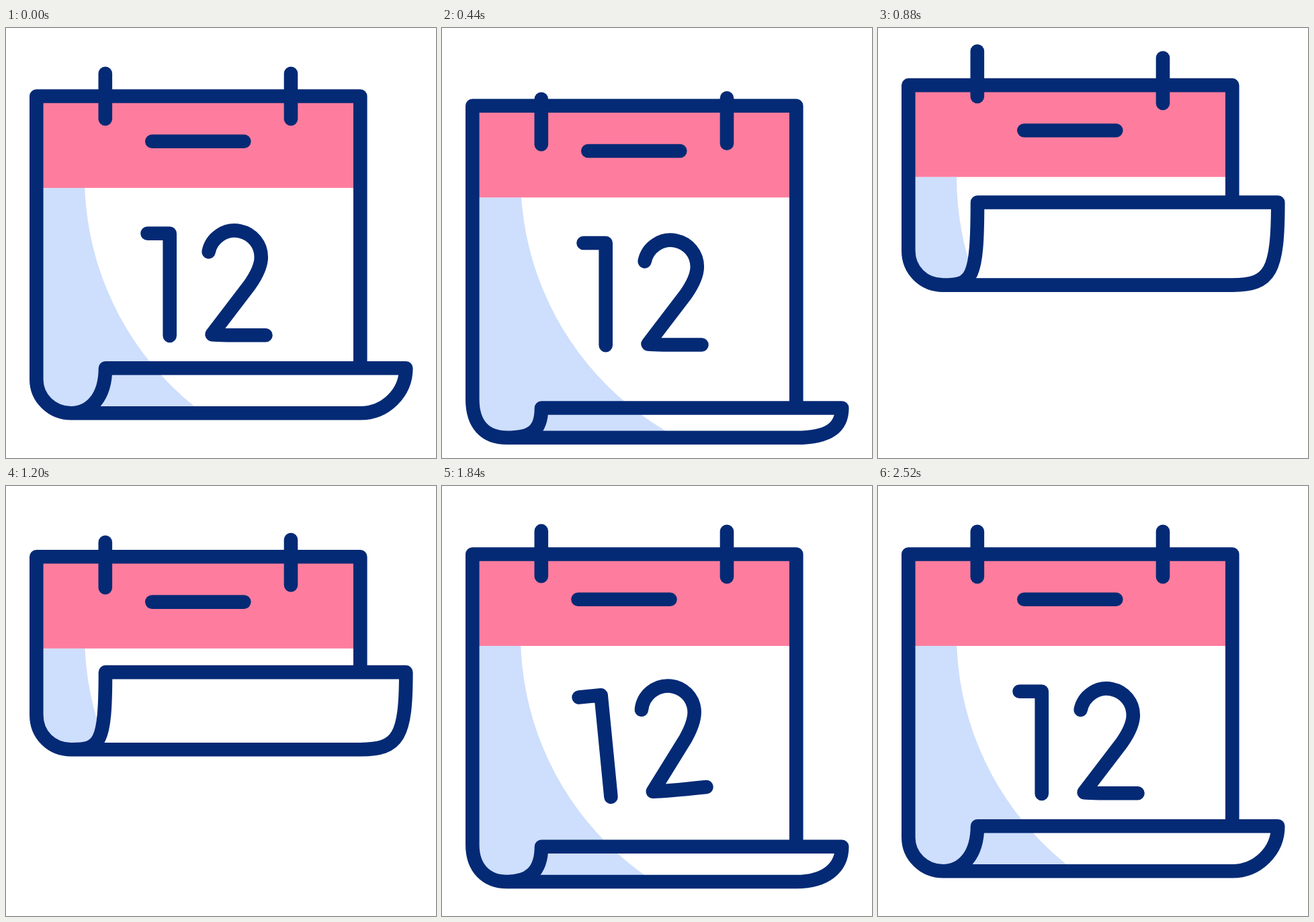
Write an HTML page with a canvas that moves like this. It is 640 by 640 pixels and loops after 2.88 s.

```html
<!DOCTYPE html>
<html lang="en">
<head>
<meta charset="utf-8">
<title>Calendar</title>
<style>
  html, body { margin: 0; width: 100%; height: 100%; overflow: hidden; background: #fff; }
  canvas { display: block; width: 640px; height: 640px; }
</style>
</head>
<body>
<canvas id="stage" width="640" height="640"></canvas>
<script>
const ctx = document.getElementById('stage').getContext('2d');
const NAVY = '#042a75', PINK = '#fe7d9e', BLUE = '#cedefd', WHITE = '#fff';
const LOOP = 2880, STEP = 40, MOVE_END = 2520;
const LEFT = 45.3, RIGHT = 527.3, CURL = 148, ROLL = 97, TIP = 595.3;
const REST_BOTTOM = 573.2;

const easeInOut = u => u < .5 ? 2 * u * u : 1 - 2 * (1 - u) ** 2;

// Swings between turning points given as [time, value].
function swing(...turns) {
  return time => turns.reduce((value, [t, target], i) => {
    const from = i ? turns[i - 1][0] : t;
    if (time <= from) return value;
    return value + (target - value) * easeInOut(Math.min(1, (time - from) / (t - from)));
  }, turns[0][1]);
}

const pageShift = swing([0, 0], [400, 16], [690, -30], [1120, 5], [1540, -11.5], [1840, 0]);
const ringShift = swing([0, 0], [410, 38], [720, -46], [1100, 18], [1510, -30], [1840, 0]);
const rollShift = swing([0, 0], [360, 50], [840, -191], [1120, -181], [1270, -181], [1720, 25], [2000, 0]);
const dashShift = swing([1210, 0], [1850, -375], [2160, -360]);
const digitTilt = swing([1240, 0], [1520, 2], [1840, -5.6], [2160, 0]);

// The paper roll flattens when it hangs low and opens when it is wound up.
function rollShape(shift) {
  const size = Math.abs(shift);
  const bottom = REST_BOTTOM + shift;
  const height = shift > 0 ? 67 - 27 * (1 - Math.exp(-shift / 20)) : 67 + 8.1e-6 * size ** 3;
  return {
    bottom, height, fold: bottom - height,
    bend: 50 + .45 * size * Math.exp(-size / 45),
    round: .552 + .3 * (1 - Math.exp(-size / 60)),
  };
}

function line(...points) {
  ctx.beginPath();
  points.forEach(([x, y]) => ctx.lineTo(x, y));
  ctx.stroke();
}

function leftBend({ bottom, bend }) {
  const k = .552 + (bend - 50) * .013;
  ctx.lineTo(LEFT, bottom - bend);
  ctx.bezierCurveTo(LEFT, bottom - bend * (1 - k), ROLL - (ROLL - LEFT) * k, bottom, ROLL, bottom);
}

function drawShade(top, roll) {
  ctx.save();
  ctx.beginPath();
  ctx.moveTo(LEFT, top);
  leftBend(roll);
  ctx.lineTo(RIGHT, roll.bottom);
  ctx.lineTo(RIGHT, top);
  ctx.clip();
  ctx.fillStyle = BLUE;
  ctx.beginPath();
  ctx.rect(0, -400, 1200, 1200);
  ctx.arc(555, 222, 438, 0, 2 * Math.PI);
  ctx.fill('evenodd');
  ctx.restore();
}

function drawDigits(shift, tilt, fold) {
  ctx.save();
  ctx.beginPath();
  ctx.rect(0, 0, 640, fold);
  ctx.clip();
  ctx.translate(297, 381 + shift);
  ctx.rotate(tilt * Math.PI / 180);
  ctx.translate(-297, -381);
  line([210.5, 305.8], [243.7, 305.8], [243.7, 458]);
  ctx.beginPath();
  ctx.arc(340.3, 341, 39.5, Math.PI + .2, 2 * Math.PI);
  ctx.bezierCurveTo(379.8, 355, 372, 369, 363, 382);
  ctx.lineTo(306.5, 456);
  ctx.quadraticCurveTo(312, 457.6, 386.5, 457.2);
  ctx.stroke();
  ctx.restore();
}

function drawDashes(shift, offset) {
  const y = 168.8 + shift;
  ctx.save();
  ctx.beginPath();
  ctx.rect(LEFT, 0, RIGHT - LEFT, 640);
  ctx.clip();
  for (const x of [217.3 + offset, 577.3 + offset]) line([x, y], [x + 137, y]);
  ctx.restore();
}

function drawOutline(top, roll) {
  const { bottom, height, fold, round } = roll;
  ctx.beginPath();
  ctx.moveTo(RIGHT, fold);
  ctx.lineTo(RIGHT, top);
  ctx.lineTo(LEFT, top);
  leftBend(roll);
  ctx.lineTo(RIGHT, bottom);
  ctx.bezierCurveTo(RIGHT + (TIP - RIGHT) * round, bottom, TIP, fold + height * round, TIP, fold);
  ctx.lineTo(CURL, fold);
  ctx.bezierCurveTo(CURL, fold + height * (round + .1), ROLL + (CURL - ROLL) * round, bottom, ROLL, bottom);
  ctx.stroke();
}

function draw(time) {
  const shift = pageShift(time), top = 101.5 + shift, pinkEnd = 238 + shift;
  const roll = rollShape(rollShift(time));

  ctx.fillStyle = WHITE;
  ctx.fillRect(0, 0, 640, 640);
  ctx.strokeStyle = NAVY;
  ctx.lineWidth = 20.6;
  ctx.lineCap = ctx.lineJoin = 'round';

  drawShade(pinkEnd, roll);
  ctx.fillStyle = PINK;
  ctx.fillRect(LEFT, top, RIGHT - LEFT, pinkEnd - top);
  drawDigits(shift, digitTilt(time), roll.fold);
  drawDashes(shift, dashShift(time));
  drawOutline(top, roll);

  // The left ring trails the right one by one step.
  for (const [x, lag] of [[147.8, STEP], [424, 0]]) {
    const y = 67.8 + ringShift(time - lag);
    line([x, y], [x, y + 67.4]);
  }
}

const start = performance.now();
function tick() {
  const time = (performance.now() - start) % LOOP;
  draw(Math.min(MOVE_END, Math.floor(time / STEP) * STEP));
  requestAnimationFrame(tick);
}
tick();
</script>
</body>
</html>
```
